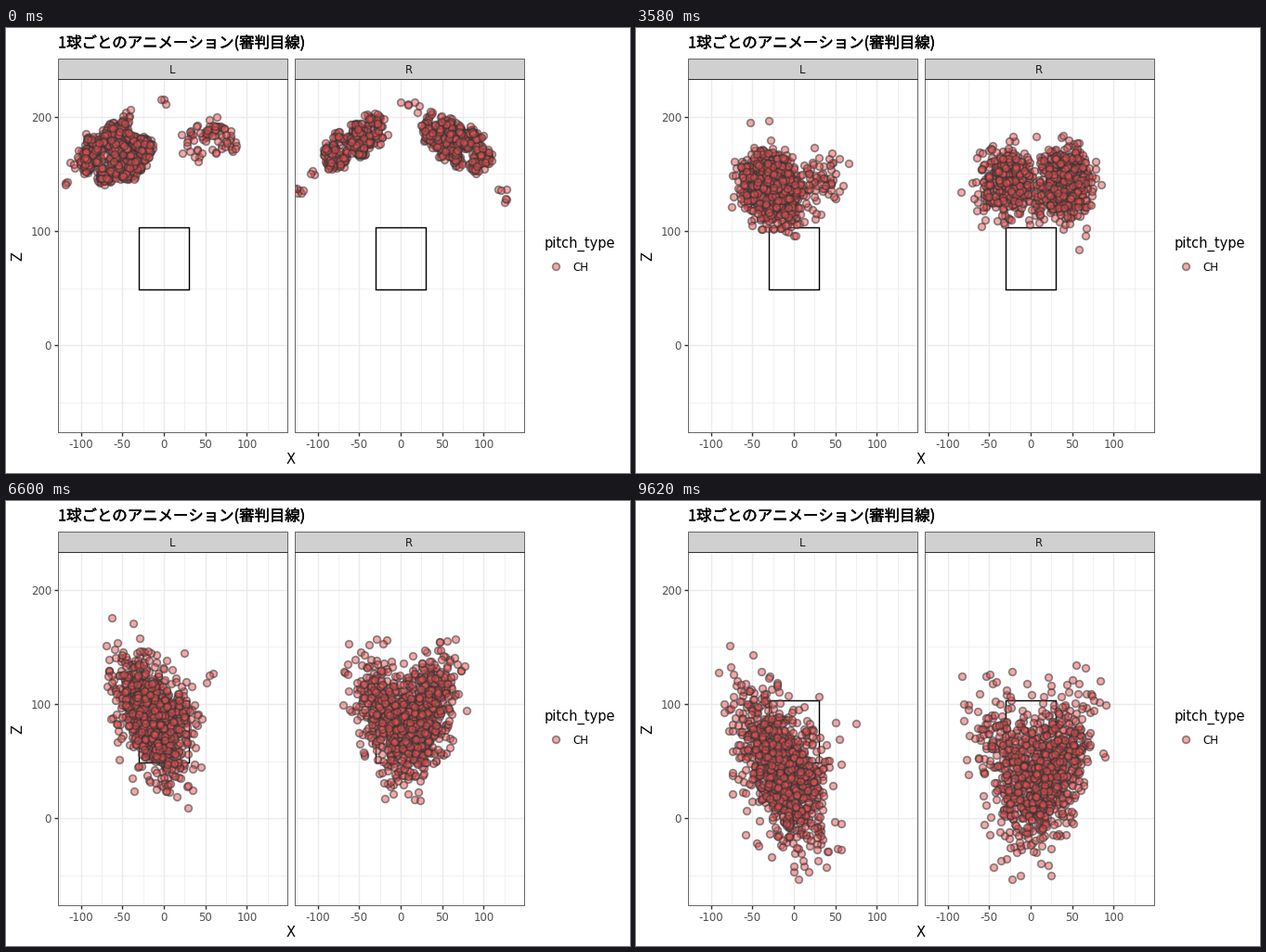
A matplotlib script for the animation above (10 s loop, 672 by 480 pixels).

```python
import numpy as np
import matplotlib.pyplot as plt
from matplotlib.animation import FuncAnimation
from matplotlib.patches import Rectangle
from matplotlib.patheffects import withStroke

W, H, DPI = 672, 480, 96
PX = 72 / DPI
LOOP_MS, STEPS = 10000, 53
LAST_STEP = STEPS - 2

GREY10, GREY20, GREY30 = "#1A1A1A", "#333333", "#4D4D4D"
STRIP, BORDER, GRID = "#D0D0D0", "#666666", "#EBEBEB"
DOT = dict(s=(7.7 * PX) ** 2, facecolor=(0.91, 0.32, 0.32, 0.5),
           edgecolor=(0.2, 0.2, 0.2, 0.55), linewidth=1.7 * PX)

XLIM, ZLIM = (-128.1, 148.1), (-76, 232.8)
STRIP_TOP, TOP, BOTTOM, PANEL_W = 32.5, 55.2, 436.0, 247.0
ZONE_X, ZONE_Z = (-30.4, 30.4), (49, 103.3)
DROP = 80

rng = np.random.default_rng(5)


def normal(*shape):
    return rng.normal(size=shape).clip(-3, 3)


def flights(x0, z0, side, aim, curve):
    """Rows of x0, z0, x1, z1, sideways curve, flight time in steps."""
    n = len(x0)
    u, v = normal(2, n)
    rho = 0.48 * side
    x1 = aim + 24.5 * u
    z1 = 42 + 31 * (rho * u + np.sqrt(1 - rho ** 2) * v)
    time = (45 + 2.3 * normal(n)).clip(41, LAST_STEP)
    return np.column_stack([x0, z0, x1, z1, np.full(n, curve), time])


def throw(pitchers, each, center, radii, slope, aim, curve, strays):
    """Each pitcher repeats one release point; strays sit on a wide arm arc."""
    side = np.sign(center[0])
    a = rng.uniform(0, 2 * np.pi, pitchers)
    d = np.sqrt(rng.random(pitchers))
    dx = radii[0] * d * np.cos(a)
    dz = radii[1] * d * np.sin(a) + slope * dx
    t = rng.random(strays)
    x0 = np.r_[np.repeat(center[0] + dx, each), np.repeat(side * 135 * t, 3)]
    z0 = np.r_[np.repeat(center[1] + dz, each), np.repeat(213 - 95 * t ** 2, 3)]
    n = len(x0)
    return flights(x0 + 3 * normal(n), z0 + 2.5 * normal(n), side, aim, curve)


def positions(pitches, step):
    x0, z0, x1, z1, curve, time = pitches.T
    s = np.minimum(step / time, 1)
    arc = s * (1 - s)
    return np.column_stack([x0 + (x1 - x0) * s + curve * arc,
                            z0 + (z1 - z0) * s + DROP * arc])


pitches_l = np.vstack([
    throw(60, 16, (-59, 168), (41, 25), 0.15, aim=-17, curve=59, strays=3),
    throw(20, 3, (53, 178), (30, 14), 0.0, aim=12, curve=-30, strays=5)])
pitches_r = np.vstack([
    throw(40, 10, (-57, 177), (38, 17), 0.45, aim=-14, curve=50, strays=3),
    throw(50, 11, (66, 177), (42, 18), -0.35, aim=22, curve=-40, strays=6)])
rng.shuffle(pitches_l)
rng.shuffle(pitches_r)

plt.rcParams.update({"font.family": "DejaVu Sans", "axes.unicode_minus": False})
fig = plt.figure(figsize=(W / DPI, H / DPI), dpi=DPI, facecolor="white")

# Full-stage layer in pixel coordinates
stage = fig.add_axes([0, 0, 1, 1])
stage.set(xlim=(0, W), ylim=(H, 0))
stage.axis("off")


def label(x, y, text, size, color="black", **kw):
    return stage.text(x, y, text, fontsize=size * PX, color=color, **kw)


def panel(left, name, pitches, show_z):
    stage.add_patch(Rectangle((left, STRIP_TOP), PANEL_W, TOP - STRIP_TOP,
                              fc=STRIP, ec=BORDER, lw=PX))
    label(left + PANEL_W / 2, 48.8, name, 11.73, GREY10, ha="center")

    ax = fig.add_axes([left / W, 1 - BOTTOM / H, PANEL_W / W, (BOTTOM - TOP) / H])
    ax.set(xlim=XLIM, ylim=ZLIM)
    ax.set_xticks(range(-100, 101, 50))
    ax.set_xticks(range(-125, 126, 50), minor=True)
    ax.set_yticks(range(0, 201, 100))
    ax.set_yticks(range(-50, 151, 100), minor=True)
    ax.set_axisbelow(True)
    ax.grid(which="major", color=GRID, lw=1.42 * PX)
    ax.grid(which="minor", color=GRID, lw=0.71 * PX)
    ax.tick_params(length=2.75, width=1.07, pad=2.2, color=GREY20,
                   labelcolor=GREY30, labelsize=11.73 * PX)
    ax.tick_params(which="minor", length=0)
    if not show_z:
        ax.tick_params(axis="y", left=False, labelleft=False)
    for spine in ax.spines.values():
        spine.set(color=BORDER, linewidth=PX)
    ax.spines["top"].set_color(GREY20)

    ax.add_patch(Rectangle((ZONE_X[0], ZONE_Z[0]), np.ptp(ZONE_X), np.ptp(ZONE_Z),
                           fill=False, ec="black", lw=1.42 * PX, zorder=2))
    return ax.scatter(*positions(pitches, 0).T, zorder=2.2, **DOT)


dots_l = panel(55.5, "L", pitches_l, True)
dots_r = panel(310.5, "R", pitches_r, False)

title = label(56, 21.3, "1球ごとのアニメーション(審判目線)", 16.4,
              family="Noto Sans CJK JP")
title.set_path_effects([withStroke(linewidth=0.35, foreground="black")])
label(307, 470, "X", 14.67, ha="center")
label(13, 246, "Z", 14.67, rotation=90, ha="center", va="center")
label(579.5, 236.5, "pitch_type", 14.67)
label(610, 262, "CH", 11.73)
stage.scatter([591.8], [257], **DOT)


def draw(step):
    dots_l.set_offsets(positions(pitches_l, step))
    dots_r.set_offsets(positions(pitches_r, step))
    return dots_l, dots_r


anim = FuncAnimation(fig, draw, frames=STEPS, interval=LOOP_MS / STEPS,
                     repeat=True, repeat_delay=0)
plt.show()
```
